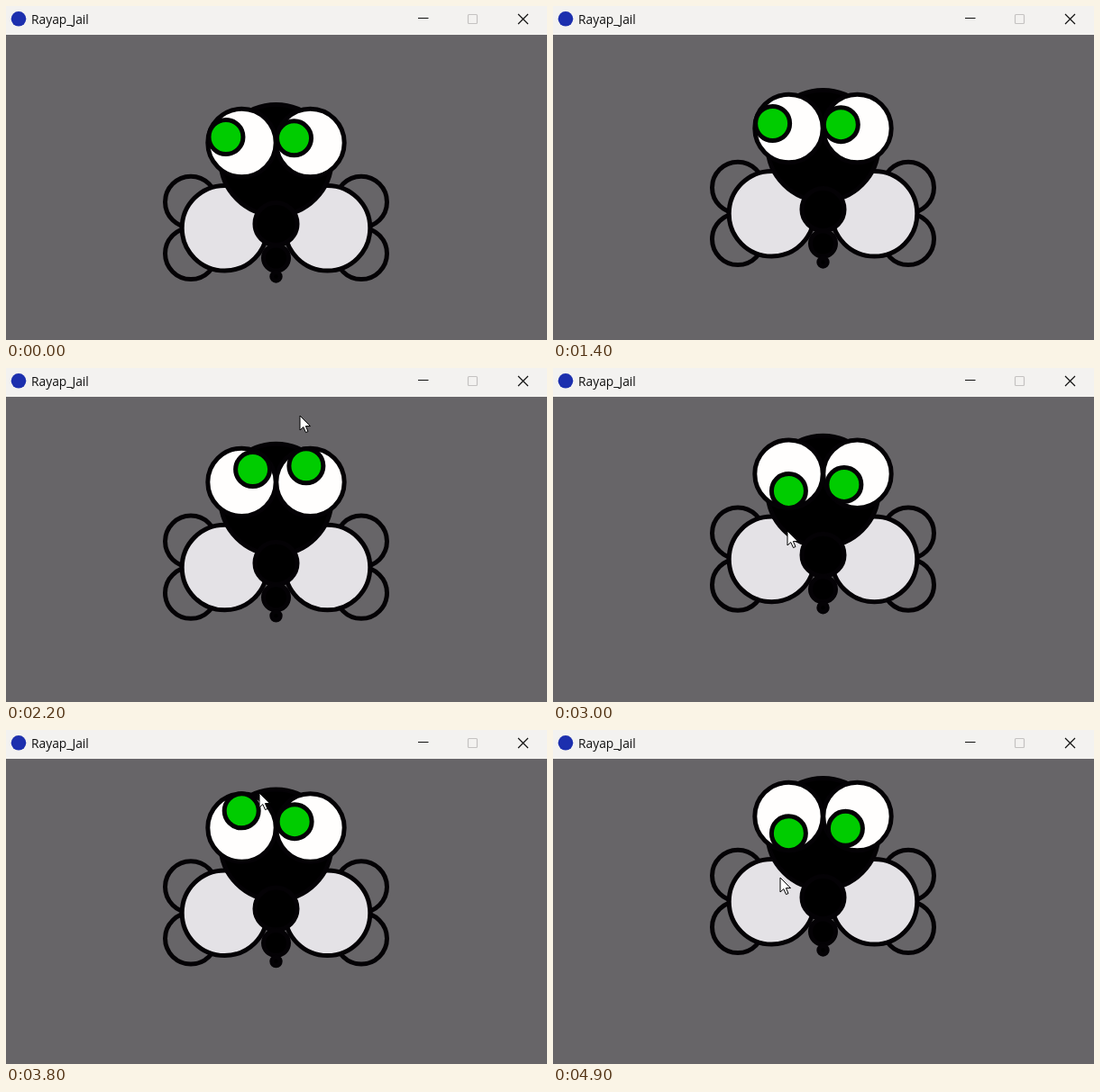
An HTML page that plays this animation: 600x371 px, repeating every 5000 ms.

```html
<!DOCTYPE html>
<html lang="id">
<head>
<meta charset="utf-8">
<title>Rayap_Jail</title>
<style>
  html, body { margin: 0; width: 100%; height: 100%; overflow: hidden; background: #676568; }
  svg { display: block; width: 600px; height: 371px; }
</style>
</head>
<body>
<svg viewBox="0 0 600 371">
  <rect width="600" height="371" fill="#676568"/>
  <rect width="600" height="32" fill="#f3f2f0"/>
  <circle cx="14" cy="14.3" r="8.3" fill="#1c2fae"/>
  <text x="28" y="20" font-size="13.8" font-family="'Open Sans', 'Noto Sans', sans-serif" fill="#111">Rayap_Jail</text>
  <g fill="none" stroke="#111" stroke-width="1.2">
    <path d="M457 13.5H468.5M568 9L579 20M579 9L568 20"/>
    <rect x="512.5" y="9.5" width="10" height="10" rx="1" stroke="#c4c2c1"/>
  </g>
  <g id="bug" stroke="#040205" stroke-width="5">
    <g id="wings">
      <circle cx="94.5" cy="217.7" r="28.5" fill="none"/>
      <circle cx="94.5" cy="275" r="28.5" fill="none"/>
      <circle cx="57" cy="246.7" r="47.3" fill="#e4e2e6"/>
    </g>
    <use href="#wings" transform="scale(-1 1)"/>
    <circle cy="171" r="61.5"/>
    <circle cy="242" r="23.5"/>
    <circle cy="280" r="14"/>
    <circle cy="300.5" r="4.7"/>
    <circle id="eye" cx="38" cy="152" r="37.7" fill="#fffefd"/>
    <use href="#eye" transform="scale(-1 1)"/>
    <circle class="pupil" r="19" fill="#00cc00"/>
    <circle class="pupil" r="19" fill="#00cc00"/>
  </g>
  <path id="cursor" d="M0 0V16L3.8 12.6L6.5 18.6L9 17.5L6.4 11.6H11.5Z" fill="#fff" stroke="#000"/>
</svg>
<script>
const LOOP = 5000, STEP = 100, RISE = 56 / 49;
const MID = 299.5, EYE_X = 38, EYE_Y = 152, REACH = 18.7;
const OUTSIDE = [0, 55];

// Turning points of the pointer: time, x, y
const STOPS = [
  [1900, 76, 5], [2100, 320, 58], [2200, 326, 53], [3000, 260, 181],
  [3700, 261, 78], [4400, 351, 42], [4800, 261, 174], [4900, 252, 164]
];
const ENTER = STOPS[0][0];

const bug = document.getElementById('bug');
const cursor = document.getElementById('cursor');
const pupils = document.querySelectorAll('.pupil');

// Each stroke of the hand starts fast and slows into the next stop
function pointer(t) {
  if (t < ENTER) return OUTSIDE;
  const i = Math.max(1, STOPS.findIndex(s => s[0] >= t));
  const [t0, x0, y0] = STOPS[i - 1];
  const [t1, x1, y1] = STOPS[i];
  const k = Math.sin((t - t0) / (t1 - t0) * Math.PI / 2);
  return [x0 + (x1 - x0) * k, y0 + (y1 - y0) * k];
}

function draw(now) {
  const t = Math.floor(now % LOOP / STEP) * STEP;
  const lift = t / STEP * RISE;
  bug.setAttribute('transform', `translate(${MID} ${-lift})`);

  // The eyes follow the pointer one step late
  const [lookX, lookY] = pointer(t - STEP);
  [-EYE_X, EYE_X].forEach((x, i) => {
    const a = Math.atan2(lookY + lift - EYE_Y, lookX - MID - x);
    pupils[i].setAttribute('cx', x + REACH * Math.cos(a));
    pupils[i].setAttribute('cy', EYE_Y + REACH * Math.sin(a));
  });

  cursor.setAttribute('visibility', t < ENTER ? 'hidden' : 'visible');
  cursor.setAttribute('transform', `translate(${pointer(t)})`);
}

const start = performance.now();
function tick() {
  draw(performance.now() - start);
  requestAnimationFrame(tick);
}
tick();
</script>
</body>
</html>
```
